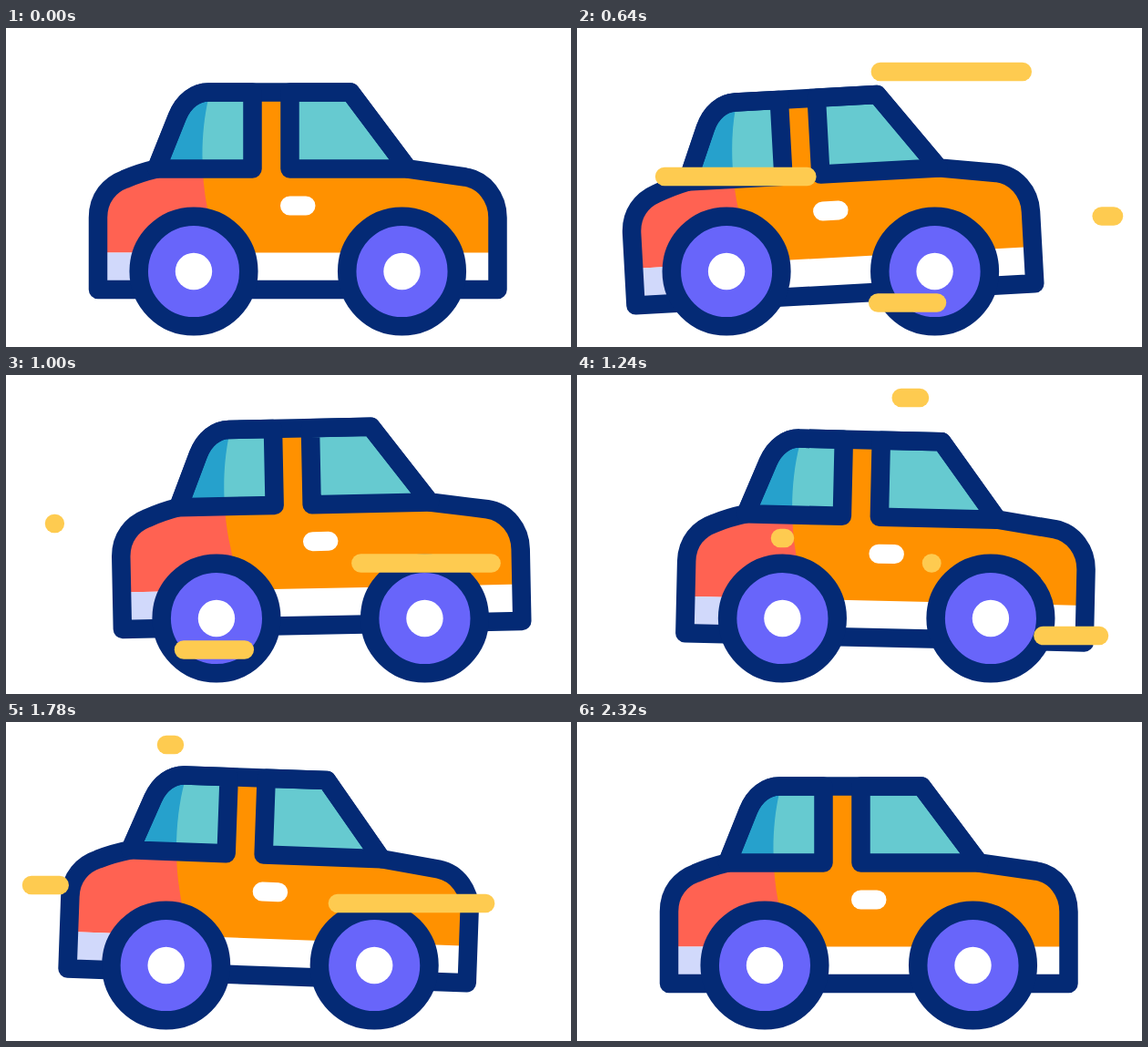
An HTML page that plays this animation: 620 px wide and 350 px high, repeating every 2420 ms.

```html
<!DOCTYPE html>
<html lang="en">
<head>
<meta charset="utf-8">
<title>Driving car</title>
<style>
  html, body { margin: 0; width: 100%; height: 100%; overflow: hidden; background: #fff; }
  svg { display: block; width: 620px; height: 350px; }
  .line { fill: none; stroke: #042a75; stroke-width: 20.5; stroke-linejoin: round; }
  .wheel { fill: #6865fa; stroke: #042a75; stroke-width: 20.5; }
  .shade { clip-path: url(#shade); }
  #streaks { stroke: #fecb50; stroke-width: 20.5; stroke-linecap: round; }
</style>
</head>
<body>
<svg viewBox="0 0 620 350">
  <defs>
    <path id="shell" d="M101 287V208C101 186 114 172 130 166Q146 159 165 154.5L188 97C195 80 208 70.5 222 70.5H378L441 154.5L504 163.5C525 167 539.5 186 539.5 208V287Z"/>
    <path id="rear" d="M165 154.5L188 97C195 80 208 70.5 222 70.5H270.5V154.5Z"/>
    <path id="front" d="M311.5 70.5H378L441 154.5H311.5Z"/>
    <rect id="sill" x="101" y="246.5" width="438" height="40"/>
    <clipPath id="shade"><path d="M60 50H230L222 78C214 112 213 158 221 198L240 300H60Z"/></clipPath>
    <g id="wheel">
      <circle class="wheel" r="60.3"/>
      <circle r="20.2" fill="#fff"/>
    </g>
  </defs>
  <g id="body">
    <use href="#shell" fill="#ff9100"/>
    <use href="#shell" fill="#ff6252" class="shade"/>
    <use href="#sill" fill="#fff"/>
    <use href="#sill" fill="#d1d9fb" class="shade"/>
    <use href="#front" fill="#66cad0"/>
    <use href="#rear" fill="#66cad0"/>
    <use href="#rear" fill="#26a1cc" class="shade"/>
    <g class="line">
      <use href="#shell"/>
      <use href="#rear"/>
      <use href="#front"/>
    </g>
    <rect x="301" y="184.5" width="38.5" height="21" rx="10.5" fill="#fff"/>
  </g>
  <g id="wheels">
    <use href="#wheel" x="206" y="267"/>
    <use href="#wheel" x="434.5" y="267"/>
  </g>
  <g id="streaks"></g>
</svg>
<script>
const LOOP = 2420;
const LENGTH = 200, HEAD_TIME = 446, TAIL_DELAY = 295, TAIL_TIME = 390;
const byId = id => document.getElementById(id);

const ease = p => (1 - Math.cos(Math.PI * Math.min(1, Math.max(0, p)))) / 2;

// Sways from rest through [time, value] turning points, then back to rest at `end`.
function sway(t, end, ...turns) {
  let value = 0, from = 0;
  for (const [time, target] of [...turns, [end, 0]]) {
    if (t < time) return value + (target - value) * ease((t - from) / (time - from));
    [from, value] = [time, target];
  }
  return 0;
}

// A streak is a line whose head runs left from x and whose tail follows later.
function makeStreak(start, x, y) {
  const line = document.createElementNS("http://www.w3.org/2000/svg", "line");
  line.setAttribute("y1", y);
  line.setAttribute("y2", y);
  byId("streaks").append(line);
  return t => {
    const age = t - start;
    const visible = age >= 0 && age <= TAIL_DELAY + TAIL_TIME;
    line.setAttribute("visibility", visible ? "visible" : "hidden");
    line.setAttribute("x1", x - LENGTH * ease(age / HEAD_TIME));
    line.setAttribute("x2", x - LENGTH * ease((age - TAIL_DELAY) / TAIL_TIME));
  };
}

const streaks = [
  makeStreak(229, 530, 48),
  makeStreak(332, 253, 163),
  makeStreak(469, 395, 301.5),
  makeStreak(567, 589, 206.5),
  makeStreak(1074, 573, 286),
  makeStreak(1149, 376, 25),
  makeStreak(1196, 228, 179),
  makeStreak(1384, 558, 199)
];

function draw() {
  const t = performance.now() % LOOP;
  const dx = sway(t, 2210, [580, -44.5], [1095, 31], [1630, -36]);
  const dy = sway(t, 2190, [480, 11.2], [975, -12.7], [1400, 7.6], [1800, -8.7]);
  const tilt = sway(t, 2170, [655, -3.15], [1550, 2.95]);
  byId("body").setAttribute("transform", `translate(${dx} ${dy}) rotate(${tilt} 320 195)`);
  byId("wheels").setAttribute("transform", `translate(${dx} 0)`);
  streaks.forEach(update => update(t));
  requestAnimationFrame(draw);
}
draw();
</script>
</body>
</html>
```
